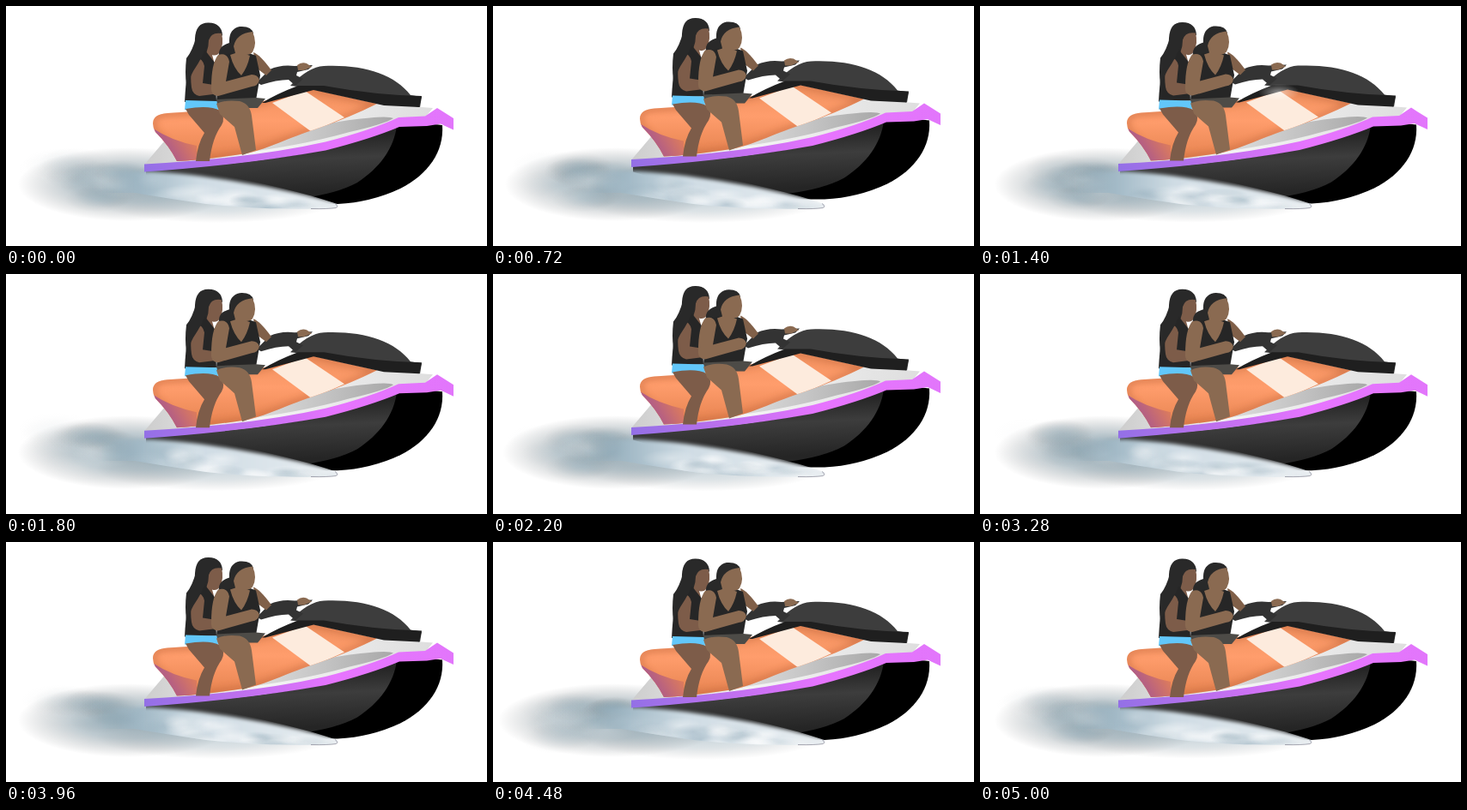
Write an HTML page that moves like this. It is 560 px wide and 280 px high and loops after 5.04 s.

```html
<!DOCTYPE html>
<html lang="en">
<head>
<meta charset="utf-8">
<title>Jet ski</title>
<style>
html, body { margin: 0; width: 100%; height: 100%; overflow: hidden; background: #fff; }
svg { display: block; width: 560px; height: 280px; }
</style>
</head>
<body>
<svg viewBox="0 0 560 280">
  <defs>
    <linearGradient id="rail">
      <stop offset="0" stop-color="#9370e6"/><stop offset=".3" stop-color="#bd70ee"/>
      <stop offset=".62" stop-color="#e774ff"/><stop offset="1" stop-color="#e276fb"/>
    </linearGradient>
    <linearGradient id="hull" x1="0" y1="0" x2=".15" y2="1">
      <stop offset=".25" stop-color="#252525"/><stop offset=".55" stop-color="#3d3d3d"/>
      <stop offset="1" stop-color="#252525"/>
    </linearGradient>
    <linearGradient id="deck">
      <stop offset="0" stop-color="#cdcdcd"/><stop offset=".4" stop-color="#f4f4f4"/>
      <stop offset="1" stop-color="#dedede"/>
    </linearGradient>
    <linearGradient id="recess">
      <stop offset="0" stop-color="#e6e6e6"/><stop offset=".6" stop-color="#c2c2c2"/>
      <stop offset="1" stop-color="#a8a8a8"/>
    </linearGradient>
    <linearGradient id="seat" x1="0" y1="0" x2="0" y2="1">
      <stop offset="0" stop-color="#f0905e"/><stop offset=".45" stop-color="#ff9d6c"/>
      <stop offset="1" stop-color="#e5824f"/>
    </linearGradient>
    <linearGradient id="tail" x1="0" y1="1" x2="1" y2=".5">
      <stop offset="0" stop-color="#8b4aa8"/><stop offset=".55" stop-color="#b9627f"/>
      <stop offset="1" stop-color="#dd7c5c"/>
    </linearGradient>
    <linearGradient id="wake" gradientUnits="userSpaceOnUse" x1="110" y1="0" x2="386" y2="0">
      <stop offset="0" stop-color="#8fabba" stop-opacity="0"/><stop offset=".18" stop-color="#a3bac7"/>
      <stop offset=".42" stop-color="#cfdce4"/><stop offset="1" stop-color="#e8edf1"/>
    </linearGradient>
    <radialGradient id="mist">
      <stop offset="0" stop-color="#6f8f9f" stop-opacity=".85"/>
      <stop offset=".5" stop-color="#748e9b" stop-opacity=".55"/>
      <stop offset="1" stop-color="#777" stop-opacity="0"/>
    </radialGradient>
    <radialGradient id="blue">
      <stop offset="0" stop-color="#7795a6"/><stop offset="1" stop-color="#7795a6" stop-opacity="0"/>
    </radialGradient>
    <radialGradient id="white">
      <stop offset="0" stop-color="#fff"/><stop offset="1" stop-color="#fff" stop-opacity="0"/>
    </radialGradient>
    <filter id="soft" x="-20%" y="-40%" width="140%" height="180%"><feGaussianBlur stdDeviation="2.2"/></filter>
    <filter id="shade" x="-20%" y="-20%" width="140%" height="140%"><feGaussianBlur stdDeviation="4"/></filter>
    <clipPath id="wedge"><path d="M80 186H175C240 194 325 210 386 231Q388 235 380 236C330 238 270 236 226 230Q185 224 150 218H80Z"/></clipPath>
    <clipPath id="seatClip"><path id="seatShape" d="M171 137Q171 126 188 125L250 121L300 111L351 96L432 114Q400 130 365 142C325 155 310 165 280 172Q235 179 199 181Q190 163 174 147Q171 142 171 137Z"/></clipPath>
  </defs>

  <g id="spray"></g>

  <g class="bob">
    <path d="M300 180L457 140L490 137L508 139C510 170 492 196 459 213Q425 229 386 231L340 231L280 222Z"/>
    <path d="M163 192Q300 183 380 166Q425 152 455 139C452 166 435 189 409 206Q385 219 345 224L270 221L200 210L163 199Z" fill="url(#hull)"/>
  </g>

  <g clip-path="url(#wedge)">
    <path d="M90 193H170C240 197 325 214 388 230V242H200Q150 232 90 224Z" fill="url(#wake)" filter="url(#soft)"/>
    <g id="foam"></g>
  </g>
  <path d="M355 236.500Q375 237 384 235.500Q388 234 383 230.500" fill="none" stroke="#667" stroke-width=".8" opacity=".7"/>

  <g class="bob">
    <!-- deck and seat -->
    <path d="M162 184L184 158L210 176L290 168L345 145L432 114L497 119L487 131L458 132Q410 153 350 165Q270 179 162 185Z" fill="url(#deck)"/>
    <path d="M262 173Q330 143 400 133Q445 127 451 131Q440 138 400 147Q340 164 262 173Z" fill="url(#recess)"/>
    <use href="#seatShape" fill="url(#seat)"/>
    <g clip-path="url(#seatClip)">
      <use href="#seatShape" fill="none" stroke="#b85f35" stroke-width="5" opacity=".65" filter="url(#shade)"/>
      <path d="M170 142Q192 157 222 163V185H190Z" fill="url(#tail)"/>
      <path d="M310 113L348 99L394 130L356 147Z" fill="#fdebdd"/>
    </g>
    <path d="M161 184.500Q285 178 372 158.500Q425 145 457 130L488 128.500L502 119L521 131V144.500L506 137.500L490 140L458 141Q425 155 372 168.500Q280 185 161 193.500Z" fill="url(#rail)"/>

    <!-- hood and handlebar -->
    <path d="M331 93Q352 71 370 70C415 68 452 79 471 104L484 106L482 118L425 108L356 96Z" fill="#3d3d3d"/>
    <path d="M298 113Q316 102 340 93L370 93Q430 104 484 105L481 118L440 116L358 98L302 113Z" fill="#1f1f1f"/>
    <path d="M292 89L307 74Q320 68 336 70L357 69L352 74L339 77L338 81L346 85L337 93L329 86Q315 86 297 92Z" fill="#333"/>
    <ellipse id="glint" cx="348" cy="101" rx="24" ry="10" fill="url(#white)"/>

    <!-- rear rider -->
    <path d="M220 38Q221 19 236 19.500Q251 20 252 34L242 44L236 63L214 67Q220 54 220 38Z" fill="#292929"/>
    <path d="M236 40Q239 30 251 32Q254 44 249 54Q245 59 240 57L243 68L226 66Q236 55 236 40Z" fill="#7d5c49"/>
    <path d="M215 57L232 52L243 66L245 111L208 112Q210 75 215 57Z" fill="#262626"/>
    <path d="M222 61Q229 61 231 70L229 90L248 93L249 102L225 105Q217 103 216 95Q213 72 222 61Z" fill="#7d5c49"/>
    <path d="M222 34Q217 53 210 61Q208 78 210 92L218 76Q230 58 234 45Z" fill="#292929"/>
    <path d="M209 110L246 111L247 121L208 121Z" fill="#62c7fa"/>
    <path d="M209 120Q237 115 249 122Q256 130 251 139Q240 154 237 181L221 181Q223 161 231 148L213 127Z" fill="#7d5c49"/>

    <!-- front rider -->
    <path d="M288 54Q296 57 309 75L303 81L291 72Z" fill="#806049"/>
    <path d="M260 43Q259 27 272 24Q286 23 288 32L272 49L267 58L248 59Q246 47 260 43Z" fill="#292929"/>
    <path d="M249 58L264 55H283L291 58L296 81L291 110L245 111Z" fill="#262626"/>
    <path d="M265 47Q268 32 287 30Q293 43 287 54Q283 58 279 56L284 58Q281 72 274 81Q265 73 261 57L267 55Z" fill="#8a6a51"/>
    <path d="M247 57Q258 54 260 65L256 88L286 80Q293 80 295 86Q294 93 286 94L247 105Q238 104 239 95Q239 67 247 57Z" fill="#8a6a51"/>
    <path d="M245 109L291 107L302 108L293 119L247 119Z" fill="#4d4b47"/>
    <path d="M245 114Q255 109 272 111Q284 114 286 128L291 168L275 174L266 141L249 126Z" fill="#8a6a51"/>
    <path d="M339 69Q344 65 350 67L356 71L347 75L340 75Z" fill="#8a6a51"/>
  </g>
</svg>
<script>
const LOOP = 5040, STEP = 40;
// [time, rise in px]: two full hops, then a smaller one
const hops = [[0, 0], [80, 0], [800, 5.6], [1520, 0], [2240, 5.6], [2960, 0], [3600, 3.7], [4240, 0], [LOOP, 0]];
const get = id => document.getElementById(id);
const bobbing = document.querySelectorAll('.bob');
const random = n => { const s = Math.sin(n * 12.9898) * 43758.5453; return s - Math.floor(s); };

function puff(parent, fill) {
  const el = document.createElementNS('http://www.w3.org/2000/svg', 'ellipse');
  el.setAttribute('fill', `url(#${fill})`);
  get(parent).append(el);
  return el;
}

function place(el, cx, cy, rx, ry, opacity) {
  for (const [key, value] of Object.entries({ cx, cy, rx, ry, opacity })) el.setAttribute(key, value.toFixed(2));
}

const mist = puff('spray', 'mist'), under = puff('spray', 'mist');
const sprays = Array.from({ length: 24 }, (_, i) => puff('spray', i % 4 ? 'mist' : 'white'));
const foams = Array.from({ length: 32 }, (_, i) => puff('foam', i % 3 ? 'white' : 'blue'));

function rise(t) {
  const i = hops.findIndex(h => h[0] > t);
  const [t0, y0] = hops[i - 1], [t1, y1] = hops[i];
  return y0 + (y1 - y0) * (1 - Math.cos(Math.PI * (t - t0) / (t1 - t0))) / 2;
}

function draw(t) {
  const u = t / LOOP, wave = Math.sin(u * Math.PI * 14);
  bobbing.forEach(g => g.setAttribute('transform', `translate(0 ${-rise(t).toFixed(2)})`));
  get('glint').setAttribute('opacity', (.5 * Math.max(0, 1 - Math.abs(t - 1400) / 160)).toFixed(2));

  place(mist, 142 - 3 * wave, 208, 128 + 5 * wave, 43, .85);
  place(under, 245, 227, 140, 26 + wave, .45);
  sprays.forEach((el, i) => {
    const p = (random(i + 1) + u * (5 + i % 3)) % 1;
    const y = 206 + (random(i + 50) - .45) * 46 * (.35 + p);
    place(el, 195 - 142 * p, y, 24 + 22 * p, 9 + 10 * p, .2 * Math.sin(Math.PI * p));
  });
  foams.forEach((el, i) => {
    const p = (random(i + 100) + u * (5 + i % 3)) % 1;
    const x = 380 - 225 * p, top = 233 - 33 * p;
    const y = top + (237 - top) * random(i + 150);
    place(el, x, y, 14 + 20 * random(i + 200), 4 + 8 * p, (i % 3 ? .5 : .35) * Math.sin(Math.PI * p));
  });
}

const start = performance.now();
function tick() {
  const t = (performance.now() - start) % LOOP;
  draw(Math.floor(t / STEP) * STEP);
  requestAnimationFrame(tick);
}
tick();
</script>
</body>
</html>
```
